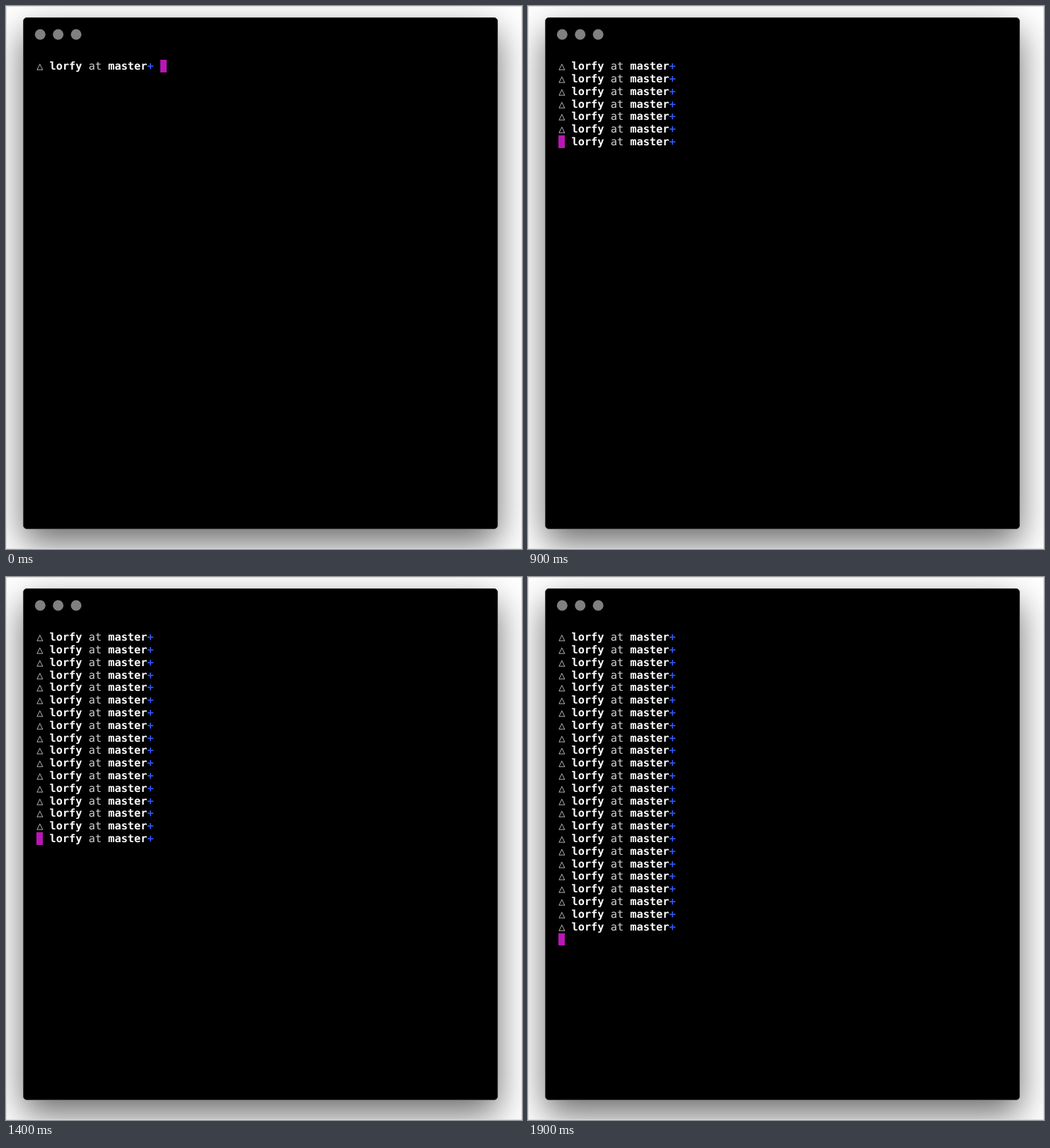
Animation of 729x768 px, one loop 2 s. Source, as an HTML page:

```html
<!DOCTYPE html>
<html lang="en">
<head>
<meta charset="utf-8">
<title>Terminal prompt</title>
<style>
  html, body { margin: 0; width: 100%; height: 100%; overflow: hidden; background: #fff; }
  svg { display: block; width: 729px; height: 768px; }
  text {
    font: 15.28px "DejaVu Sans Mono", "Liberation Mono", monospace;
    text-rendering: geometricPrecision;
    white-space: pre;
    fill: #d2d2d2;
  }
  .bold { font-weight: bold; fill: #fff; }
  .mark { font-weight: bold; fill: #2f55ea; }
</style>
</head>
<body>
<svg viewBox="0 0 729 768">
  <defs>
    <filter id="blur" x="-20%" y="-20%" width="140%" height="140%">
      <feGaussianBlur stdDeviation="25"/>
    </filter>
    <text id="prompt">△ <tspan class="bold">lorfy</tspan> at <tspan class="bold">master</tspan><tspan class="mark">+</tspan></text>
  </defs>
  <rect width="729" height="768" fill="#fff"/>
  <rect x="24" y="36" width="671" height="724" rx="5" opacity=".58" filter="url(#blur)"/>
  <rect x=".5" y=".5" width="728" height="767" fill="none" stroke="#dadada"/>
  <rect x="24.5" y="16.5" width="670" height="723" rx="5" stroke="#444"/>
  <g fill="#808080">
    <circle cx="48.3" cy="40.3" r="7.5"/>
    <circle cx="73.7" cy="40.3" r="7.5"/>
    <circle cx="99.1" cy="40.3" r="7.5"/>
  </g>
  <g id="lines"></g>
  <rect id="cursor" fill="#b916b5"/>
</svg>
<script>
const LOOP = 2000, TICK = 100;
const LEFT = 43.15, TOP = 76.1, CELL = 9.2, LINE = 17.81, BASELINE = 14;
const PROMPT_END = 19, MAX_LINES = 24;
const REPEAT_START = 7, REPEAT_ROW = 3, REPEAT_RATE = 21 / 11, PAUSE = 15;

const prompt = document.getElementById("prompt");
const lines = document.getElementById("lines");
const cursor = document.getElementById("cursor");
const columnX = column => Math.round(LEFT + column * CELL);
const rowY = row => Math.round(TOP + row * LINE);

function setAttributes(element, attributes) {
  for (const name in attributes) element.setAttribute(name, attributes[name]);
}

for (let row = 0; row < MAX_LINES; row++) {
  const line = prompt.cloneNode(true);
  line.removeAttribute("id");
  setAttributes(line, { x: LEFT, y: Math.round(TOP + row * LINE + BASELINE) });
  lines.append(line);
}

// One Enter press, then a held key that repeats with a one-tick pause.
function terminalState(tick) {
  if (tick < REPEAT_START) {
    const waiting = tick === 0 || tick > 2;
    return {
      row: Math.min(tick, 1),
      column: waiting ? PROMPT_END : 0,
      printed: tick < 2 ? 1 : 2
    };
  }
  const elapsed = tick - REPEAT_START - (tick >= PAUSE ? 1 : 0);
  const row = Math.floor(REPEAT_ROW + elapsed * REPEAT_RATE + 1e-6);
  return { row, column: 0, printed: Math.min(row + 1, MAX_LINES) };
}

function render(time) {
  const { row, column, printed } = terminalState(Math.floor(time / TICK));
  [...lines.children].forEach((line, i) => {
    line.setAttribute("visibility", i < printed ? "visible" : "hidden");
  });
  const x = columnX(column), y = rowY(row);
  setAttributes(cursor, {
    x, y,
    width: columnX(column + 1) - x,
    height: rowY(row + 1) - y
  });
}

const origin = performance.now();
function animate() {
  render((performance.now() - origin) % LOOP);
  requestAnimationFrame(animate);
}
animate();
</script>
</body>
</html>
```
